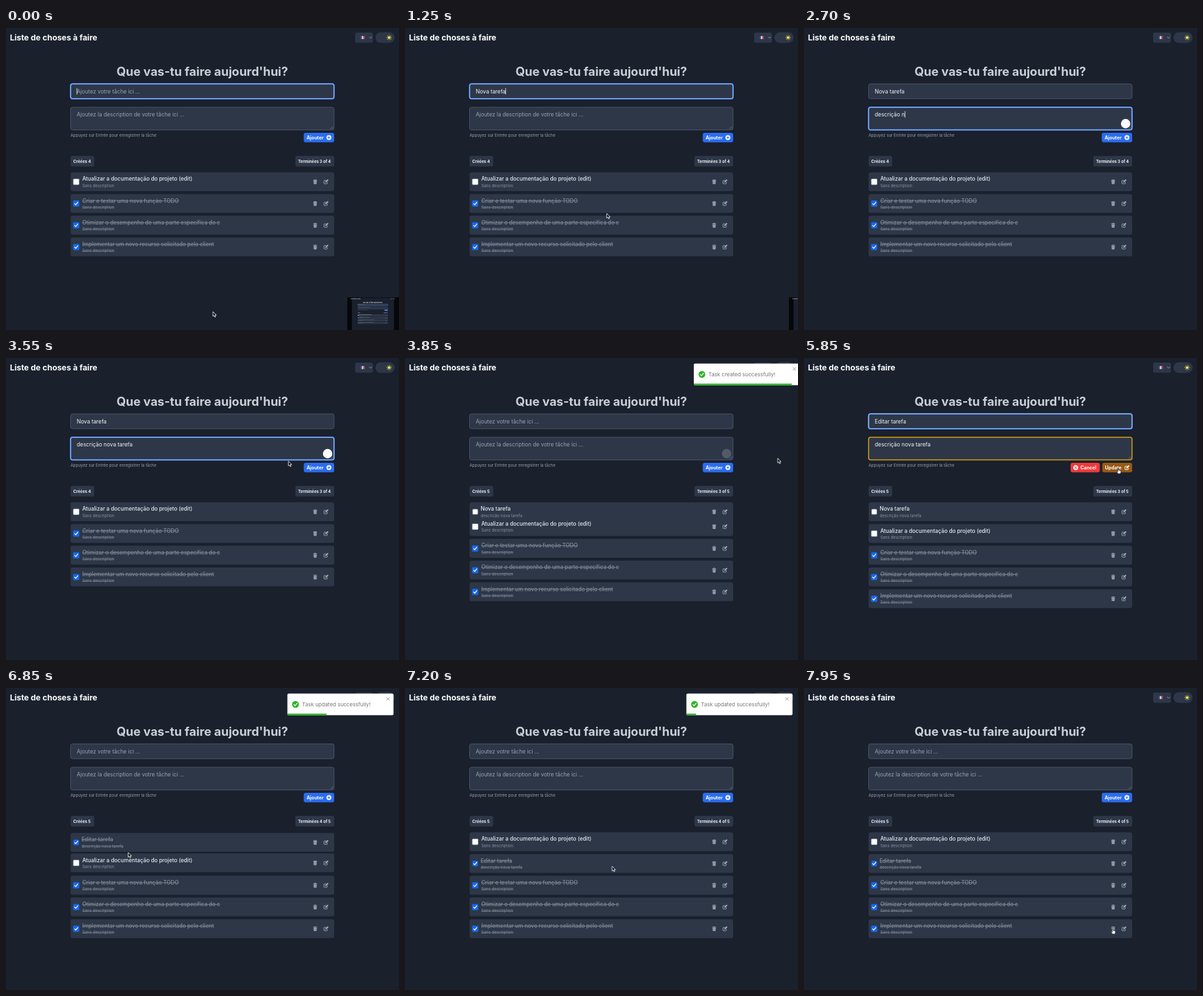
An HTML page that plays this animation: 600 px wide and 461 px high, repeating every 8 s.

```html
<!DOCTYPE html>
<html lang="fr">
<head>
<meta charset="utf-8">
<title>Liste de choses à faire</title>
<style>
html, body { margin: 0; width: 100%; height: 100%; overflow: hidden; background: #1a202c; }
svg { display: block; width: 100vw; height: 100vh; font-family: Inter, sans-serif; }
text { white-space: pre; }
.b { font-weight: 700; }
.m { font-weight: 500; }
.done text { fill: #828b99; text-decoration: line-through; }
</style>
</head>
<body>
<svg id="stage" viewBox="0 0 600 461"></svg>
<script>
const LOOP = 8000, STEP = 50;
const CARD = '#2d3748', EDGE = '#4a5568', MUTED = '#a0a8b5';
const stage = document.getElementById('stage');

function add(parent, tag, attrs = {}, content) {
  const node = document.createElementNS('http://www.w3.org/2000/svg', tag);
  set(node, attrs);
  if (content !== undefined) node.textContent = content;
  parent.append(node);
  return node;
}
function set(node, attrs) {
  for (const k in attrs) node.setAttribute(k, attrs[k]);
}
const group = (p, x = 0, y = 0) => add(p, 'g', { transform: `translate(${x} ${y})` });
const box = (p, x, y, width, height, rx, fill, more) =>
  add(p, 'rect', { x, y, width, height, rx, fill, ...more });
const label = (p, x, y, size, fill, str, cls = '') =>
  add(p, 'text', { x, y, 'font-size': size, fill, class: cls }, str);
const line = (p, d, stroke, width = 1) =>
  add(p, 'path', { d, stroke, 'stroke-width': width, fill: 'none', 'stroke-linecap': 'round', 'stroke-linejoin': 'round' });
const show = (node, on) => node.setAttribute('visibility', on ? 'inherit' : 'hidden');
const move = (node, x, y) => node.setAttribute('transform', `translate(${x} ${y})`);
const clamp = v => Math.min(1, Math.max(0, v));
const smooth = p => p * p * (3 - 2 * p);
const ramp = (t, start, length) => smooth(clamp((t - start) / length));
const typed = (str, t, start, step) => str.slice(0, Math.max(0, Math.floor((t - start) / step) + 1));

function trashIcon(p, x, y) {
  const g = group(p, x, y);
  add(g, 'path', { d: 'M-2.9-3h1.7l.4-.6h1.6l.4.6h1.7v.9h-5.8zM-2.5-1.7h5l-.3 4.6q0 .6-.6.6h-3.2q-.6 0-.6-.6z', fill: MUTED });
  line(g, 'M-1-.6v3M1-.6v3', '#5c6676', .45);
}
function editIcon(p, x, y, color) {
  const g = group(p, x, y);
  line(g, 'M.4-2.2h-2.6q-.8 0-.8.8v3.6q0 .8.8.8h3.6q.8 0 .8-.8v-1.6', color, .9);
  add(g, 'path', { d: 'M-1.2 1.3l.3-1.7 3.1-3.1q.5-.4.9 0l.5.5q.4.4 0 .9l-3.1 3.1z', fill: color });
}

// Page
box(stage, 0, 0, 600, 461, 0, '#1a202c');
const page = group(stage);
label(page, 6, 18.8, 12.3, '#fff', 'Liste de choses à faire', 'b');
box(page, 533, 7, 27.3, 15.6, 3, CARD);
['#3558a8', '#f2f2f2', '#d8404a'].forEach((c, i) => box(page, 541.4 + i * 2.1, 12.3, 2.1, 4.6, 0, c));
line(page, 'M554.7 13.8l1.8 1.8 1.8-1.8', MUTED, .9);
box(page, 564, 6.4, 29.3, 16.4, 8.2, CARD);
const sun = group(page, 585, 14.6);
add(sun, 'circle', { r: 2.2, fill: '#f4e04d' });
for (let i = 0; i < 8; i++) add(sun, 'path', { d: 'M0-2.9v-1', stroke: '#f4e04d', transform: `rotate(${i * 45})` });

set(label(page, 299.7, 73, 18.4, '#cbd0d8', "Que vas-tu faire aujourd'hui?", 'b'), { 'text-anchor': 'middle' });

function field(y, height, baseline, hint) {
  const g = group(page);
  const frame = { x: 98.6, y, width: 402.2, height, rx: 3 };
  const body = add(g, 'rect', { ...frame, fill: CARD, 'stroke-width': 1 });
  const ring = group(g);
  add(ring, 'rect', { ...frame, fill: 'none', stroke: '#3f7fee', 'stroke-width': 2 });
  add(ring, 'rect', { ...frame, fill: 'none', stroke: '#b4cffb', 'stroke-width': .8 });
  const mark = box(g, 107.6, baseline - 7.8, 20, 10, 0, '#3a69b0');
  const ghost = label(g, 108, baseline, 8.3, '#98a1ae', hint);
  const text = label(g, 108, baseline, 8.3, '#f3f5f8', '');
  const caret = box(g, 0, baseline - 7.8, .8, 9.8, 0, '#fff');
  return ({ value, focus, blink, edit, selected }) => {
    text.textContent = value;
    show(ghost, !value);
    show(ring, focus);
    show(mark, selected);
    set(body, { stroke: edit ? '#d69e12' : EDGE, 'stroke-width': edit ? 1.5 : 1 });
    show(caret, focus && blink && !selected);
    caret.setAttribute('x', 107.8 + (value ? text.getComputedTextLength() : 0));
    if (selected) mark.setAttribute('width', text.getSubStringLength(0, 4) + .6);
  };
}
const setTitle = field(85.3, 22.6, 99.6, 'Ajoutez votre tâche ici ...');
const setNote = field(121, 34.6, 134.8, 'Ajoutez la description de votre tâche ici ...');
line(page, 'M495.6 154l3.4-3.4M497.6 154l1.4-1.4', '#8a93a1', .5);
const helper = add(page, 'circle', { cx: 491, cy: 146, r: 7.2, fill: '#fff' });
label(page, 98.6, 166, 6.2, '#98a1ae', 'Appuyez sur Entrée pour enregistrer la tâche');

function button(x, width, str, textX) {
  const g = group(page);
  const face = box(g, x, 160, width, 14.6, 3, '#000');
  label(g, textX, 169.7, 7.15, '#fff', str, 'b');
  return { g, face };
}
function roundIcon(p, x, color, turn) {
  const g = add(p, 'g', { transform: `translate(${x} 167.3) rotate(${turn})` });
  add(g, 'circle', { r: 3.7, fill: '#fff' });
  line(g, 'M-1.8 0h3.6M0-1.8v3.6', color, 1.1);
}
const addBtn = button(454.6, 46.4, 'Ajouter', 459);
roundIcon(addBtn.g, 493, '#2a6df0', 0);
const cancelBtn = button(407, 44.6, 'Cancel', 422);
cancelBtn.face.setAttribute('fill', '#ee3a3d');
roundIcon(cancelBtn.g, 414.8, '#ee3a3d', 45);
const updateBtn = button(455.4, 45.6, 'Update', 459.6);
editIcon(updateBtn.g, 493, 167.4, '#fff');

box(page, 98.6, 195.2, 36, 16.4, 2.5, CARD);
box(page, 441.8, 195.2, 59.2, 16.4, 2.5, CARD);
const created = label(page, 102.8, 205.6, 6.1, '#f3f5f8', '', 'b');
const finished = label(page, 446, 205.6, 6.1, '#f3f5f8', '', 'b');

function makeRow(title, note, done, x, size) {
  const g = group(page);
  box(g, 98.6, 220.2, 402.4, 28.8, 3, CARD);
  const check = group(g, 107.2, 234.8);
  const face = box(check, -size / 2, -size / 2, size, size, 1.3, '#fff', { 'stroke-width': .5 });
  const tick = line(check, 'M-2.4.1l1.7 1.8 3.2-3.9', '#fff', 1.2);
  const name = label(g, x, 233.4, 8.25, '#e6eaf0', title, 'm');
  label(g, x, 242.7, 6.2, '#8a93a1', note);
  trashIcon(g, 472, 234.8);
  editIcon(g, 488.4, 234.8, MUTED);
  const row = {
    g, name,
    check(on) {
      g.setAttribute('class', on ? 'done' : '');
      set(face, { fill: on ? '#1668ea' : '#fff', stroke: on ? '#1668ea' : '#7a828e' });
      show(tick, on);
    },
    place: slot => move(g, 0, slot * 33.2)
  };
  row.check(done);
  return row;
}
const NONE = 'Sans description';
const fresh = makeRow('', 'descrição nova tarefa', false, 115.4, 8);
const rows = [
  ['Atualizar a documentação do projeto (edit)', false],
  ['Criar e testar uma nova função TODO', true],
  ['Otimizar o desempenho de uma parte específica do c', true],
  ['Implementar um novo recurso solicitado pelo client', true]
].map(([title, done]) => makeRow(title, NONE, done, 116.4, 9));

// Screenshot preview
const thumb = group(stage);
box(thumb, 520.4, 410.4, 84, 56, 2, '#05070a', { stroke: '#232a34', 'stroke-width': .8 });
const mini = add(thumb, 'g', { transform: 'translate(525.5 411.6) scale(.115)' });
box(mini, 22, 0, 560, 461, 0, '#1a202c');

// Toast
const GREEN = '#2fb529';
const toast = group(stage);
box(toast, 429.6, 8.4, 162, 33.2, 2, '#fff');
add(toast, 'circle', { cx: 442, cy: 25, r: 5.2, fill: GREEN });
line(toast, 'M439.5 25.2l1.8 1.9 3.3-4', '#fff', 1.2);
const message = label(toast, 452, 27.9, 8.15, '#757575', '');
line(toast, 'M581.2 14.6l4 4M585.2 14.6l-4 4', '#8c8c8c', .9);
const bar = box(toast, 429.6, 39.1, 162, 2.5, 0, GREEN);

// Pointer
const pointer = group(stage);
const rim = { stroke: '#fff', 'stroke-width': .8, 'stroke-linejoin': 'round', fill: '#0b0b0b' };
const shapes = {
  arrow: add(pointer, 'path', { d: 'M0 0v7.2l1.7-1.5 1.2 2.7 1.2-.5-1.2-2.6h2.3z', ...rim }),
  hand: add(pointer, 'path', { d: 'M-.8.6q.8-1.2 1.4 0v2.6q2.8.1 3.3 1.2.3 2.5-.9 4.4h-3.2q-1.4-1.8-2.5-3.4.3-1.2 1.9 0z', ...rim, fill: '#fff', stroke: '#222' }),
  beam: line(pointer, 'M-1.7-3.9q1.3 0 1.7.7.4-.7 1.7-.7M0-3.2v6.4M-1.7 3.9q1.3 0 1.7-.7.4.7 1.7.7M-1 1.3h2', '#d5d8dd', .8)
};
const PATH = [
  [0, 316, 433], [1150, 316, 433], [1350, 300, 133], [3450, 300, 133], [3600, 477, 166],
  [3700, 477, 166], [3850, 569, 153], [4250, 569, 153], [4400, 488, 233], [4480, 488, 233],
  [4700, 124, 104], [5500, 124, 104], [5800, 480, 168], [6050, 480, 168], [6500, 107, 235],
  [6720, 107, 235], [6850, 186.5, 251], [7050, 215, 254], [7400, 472, 300], [7650, 472, 328],
  [7950, 471.5, 367], [8000, 471.5, 367]
];
const HIDDEN = [[150, 1150], [1400, 3450], [5000, 5500]];

function pointerAt(t) {
  const i = PATH.findIndex((p, n) => n && t <= p[0]);
  const [a, b] = [PATH[i - 1], PATH[i]];
  const p = ramp(t, a[0], b[0] - a[0]);
  const x = a[1] + (b[1] - a[1]) * p, y = a[2] + (b[2] - a[2]) * p;
  const on = !HIDDEN.some(([from, to]) => t >= from && t < to);
  const inside = (l, r, top, bottom) => on && x > l && x < r && y > top && y < bottom;
  const overButton = inside(455, 501, 160, 175);
  const kind = inside(99, 501, 85, 156) ? 'beam'
    : overButton || inside(467, 493, 220, 382) ? 'hand' : 'arrow';
  return { x, y, on, overButton, kind };
}

// Bounce in from the right
function bounce(p) {
  const stops = [[0, 1518], [.6, -12.6], [.75, 5], [.9, -2.5], [1, 0]];
  if (p >= 1) return 0;
  const i = stops.findIndex(s => p < s[0]);
  const [a, b] = [stops[i - 1], stops[i]];
  const rest = 1 - (p - a[0]) / (b[0] - a[0]);
  return b[1] + (a[1] - b[1]) * rest ** 3;
}
const TOASTS = [[3715, 'Task created successfully!'], [6015, 'Task updated successfully!']];
const TOAST_LIFE = 1300;

function noteText(t) {
  if (t < 1800) return typed('desc', t, 1400, 100);
  if (t < 2650) return 'desc' + typed('rição ', t, 1850, 150);
  return 'descrição ' + typed('nova tarefa', t, 2650, 60);
}

function render(t) {
  const saved = t >= 3700, edit = t >= 4480 && t < 6000, updated = t >= 6000;
  const ticked = t >= 6700;
  const mouse = pointerAt(t);

  let title = '', lastKey = 0;
  if (!saved) { title = typed('Nova tarefa', t, 150, 95); lastKey = t < 1350 ? Math.min(t, 1100) : Math.min(t, 3250); }
  else if (edit) {
    title = t < 5050 ? 'Nova tarefa' : typed('Editar', t, 5050, 70) + ' tarefa';
    lastKey = t < 5050 ? 4480 : Math.min(t, 5400);
  }
  const blink = (t - lastKey) % 600 < 300;
  setTitle({
    value: title, edit, blink,
    focus: t < 1350 || edit,
    selected: edit && t >= 4850 && t < 5050
  });
  setNote({
    value: edit ? 'descrição nova tarefa' : saved ? '' : noteText(t),
    edit, blink, focus: t >= 1350 && t < 3650, selected: false
  });
  helper.setAttribute('opacity', t < 1750 ? 0 : 1 - .82 * ramp(t, 3650, 150) - .18 * ramp(t, 3850, 200));

  show(addBtn.g, !edit);
  show(cancelBtn.g, edit);
  show(updateBtn.g, edit);
  addBtn.face.setAttribute('fill', mouse.overButton ? '#1e4fb8' : '#2a6df0');
  updateBtn.face.setAttribute('fill', mouse.overButton ? '#975a16' : '#e2a60c');

  const total = t >= 3775 ? 5 : 4;
  created.textContent = `Créées ${total}`;
  finished.textContent = `Terminées ${ticked ? 4 : 3} of ${total}`;

  const insert = ramp(t, 3775, 120), swap = ramp(t, 6838, 120);
  show(fresh.g, total === 5);
  fresh.name.textContent = updated ? 'Editar tarefa' : 'Nova tarefa';
  fresh.check(ticked);
  fresh.place(swap);
  rows.forEach((row, i) => row.place(i + insert - (i ? 0 : swap)));

  const slide = clamp((t - 900) / 400);
  move(thumb, 85 * slide * slide, 0);
  show(thumb, slide < 1);

  const live = TOASTS.find(([start]) => t >= start && t < start + TOAST_LIFE);
  show(toast, !!live);
  if (live) {
    const age = t - live[0];
    message.textContent = live[1];
    move(toast, bounce(age / 300), 0);
    bar.setAttribute('width', 162 * Math.min(1, 1.03 - age / TOAST_LIFE * 1.03));
  }

  show(pointer, mouse.on);
  move(pointer, mouse.x, mouse.y);
  for (const k in shapes) show(shapes[k], k === mouse.kind);
}

render(0);
mini.append(page.cloneNode(true));

const begin = performance.now();
function frame(now) {
  const t = Math.max(0, now - begin) % LOOP;
  render(Math.floor(t / STEP) * STEP);
  requestAnimationFrame(frame);
}
requestAnimationFrame(frame);
</script>
</body>
</html>
```
